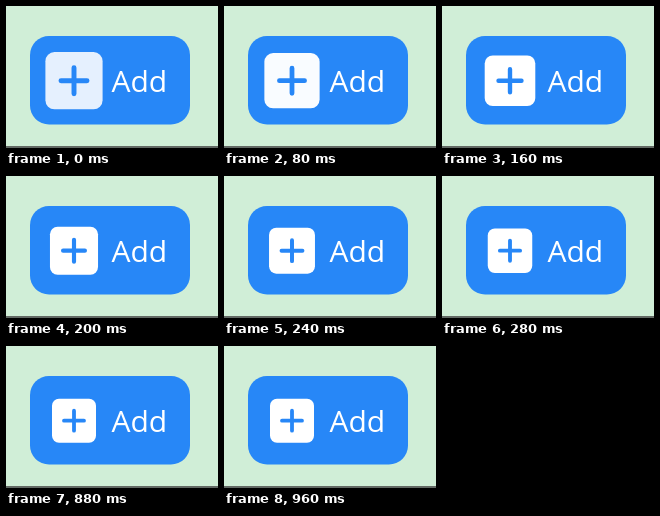
Animation, 212 px wide and 142 px high, one loop 1280 ms. Source, as an HTML page with a canvas:

```html
<!DOCTYPE html>
<html lang="en">
<head>
<meta charset="utf-8">
<style>
html, body { margin: 0; width: 100%; height: 100%; overflow: hidden; background: #d0eed7; }
canvas { display: block; }
</style>
</head>
<body>
<canvas id="stage" width="212" height="142"></canvas>
<script>
const ctx = document.getElementById('stage').getContext('2d');
const LOOP = 1280, STEP = 40, SHRINK = 320;
const BLUE = '#2787f7';

const easeInOut = p => (1 - Math.cos(Math.PI * p)) / 2;

function box(x, y, w, h, r, fill) {
  ctx.fillStyle = fill;
  ctx.beginPath();
  ctx.roundRect(x, y, w, h, r);
  ctx.fill();
}

function icon(scale, alpha) {
  ctx.save();
  ctx.translate(68, 74.7);
  ctx.scale(scale, scale);
  box(-22, -22, 44, 44, 7, `rgba(255,255,255,${alpha})`);
  ctx.strokeStyle = BLUE;
  ctx.lineWidth = 3.8;
  ctx.lineCap = 'round';
  ctx.beginPath();
  ctx.moveTo(-10, 0);
  ctx.lineTo(10, 0);
  ctx.moveTo(0, -10);
  ctx.lineTo(0, 10);
  ctx.stroke();
  ctx.restore();
}

function draw(t) {
  const p = Math.min(t / SHRINK, 1);
  ctx.fillStyle = '#d0eed7';
  ctx.fillRect(0, 0, 212, 142);
  ctx.fillStyle = '#626964';
  ctx.fillRect(0, 140, 212, 2);
  box(24, 30, 160, 88.5, 19, BLUE);
  icon(1.3 - 0.3 * easeInOut(p), Math.min(1, 0.88 + t / 850));
  ctx.fillStyle = '#fff';
  ctx.font = '30px "Open Sans", "Noto Sans", sans-serif';
  ctx.fillText('Add', 105.5, 86);
}

function tick() {
  const t = performance.now() % LOOP;
  draw(Math.floor(t / STEP) * STEP);
  requestAnimationFrame(tick);
}
tick();
</script>
</body>
</html>
```
